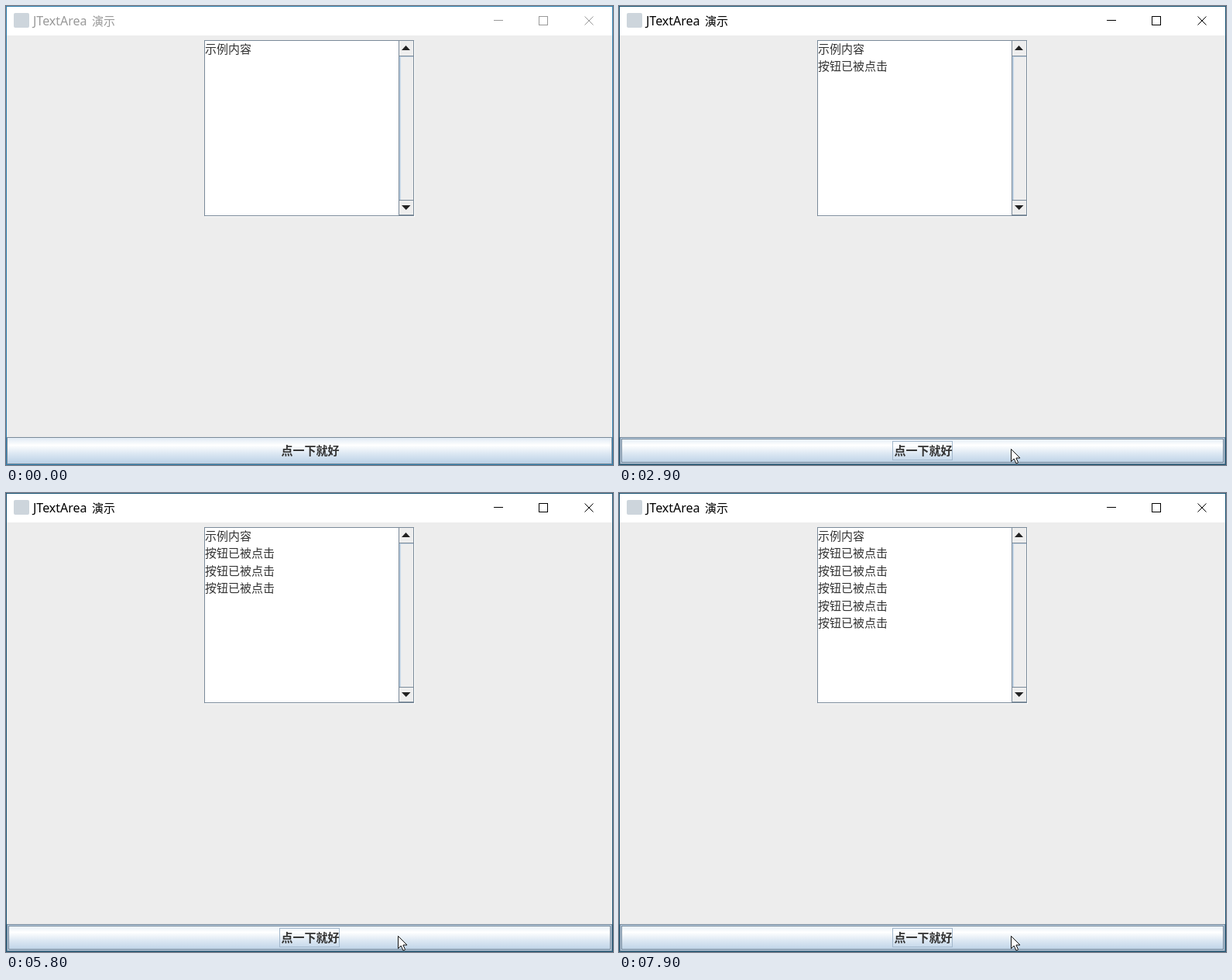
An HTML page that plays this animation: 784 px wide and 592 px high, repeating every 8000 ms.

```html
<!DOCTYPE html>
<html lang="zh">
<head>
<meta charset="utf-8">
<title>JTextArea 演示</title>
<style>
html, body { margin: 0; width: 100%; height: 100%; overflow: hidden; background: #ededed; }
svg { display: block; }
text { font-family: "Noto Sans CJK SC", "Noto Sans CJK", sans-serif; font-size: 15px; white-space: pre; }
.latin { font-family: "Noto Sans", sans-serif; font-size: 16px; }
.line { fill: none; stroke: #7a8a99; }
</style>
</head>
<body>
<svg width="784" height="592" viewBox="0 0 784 592">
  <defs>
    <linearGradient id="ocean" x2="0" y2="1">
      <stop offset="0" stop-color="#dde8f3"/>
      <stop offset=".3" stop-color="#fff"/>
      <stop offset=".6" stop-color="#dde8f3"/>
      <stop offset="1" stop-color="#b8cfe5"/>
    </linearGradient>
  </defs>
  <rect width="784" height="592" fill="#ededed"/>
  <rect width="784" height="38" fill="#fff"/>

  <rect x="10" y="9" width="20" height="19" rx="2" fill="#cdd5dc"/>
  <g id="caption">
    <text class="latin" x="35" y="25">JTextArea</text>
    <text x="111" y="25">演示</text>
  </g>
  <g id="controls" fill="none">
    <path d="M630 18.5h12M688.5 13.5h11v11h-11z" shape-rendering="crispEdges"/>
    <path d="M747.5 13.5l11 11M758.5 13.5l-11 11"/>
  </g>

  <g shape-rendering="crispEdges">
    <rect x="257" y="45" width="271" height="227" fill="#fff"/>
    <rect x="508" y="45" width="18" height="225" fill="#eee"/>
    <rect class="line" x="256.5" y="44.5" width="270" height="226"/>
    <path class="line" d="M507.5 45v225M508 64.5h18M508 250.5h18M508 269.5h18"/>
    <path d="M509.5 250V65.5H526" fill="none" stroke="#c4d3e2"/>
    <path d="M508.5 65v185" stroke="#b8cfe5"/>
  </g>
  <path d="M511 57l5.5-6 5.5 6zM511 257h11.5l-5.75 6z" fill="#222"/>
  <g id="rows" fill="#333"></g>

  <g shape-rendering="crispEdges">
    <rect id="face" x="1" y="556" width="782" height="35"/>
    <rect class="line" x="1.5" y="556.5" width="781" height="34"/>
    <g id="hover" fill="none">
      <rect x="2.5" y="557.5" width="779" height="32" stroke="#b8cfe5"/>
      <rect class="line" x="3.5" y="558.5" width="777" height="30"/>
    </g>
    <rect id="focus" x="353.5" y="561.5" width="77" height="24" fill="none" stroke="#a3b8cc"/>
  </g>
  <text x="355.5" y="579" font-weight="700" fill="#333">点一下就好</text>
  <rect id="frame" x=".5" y=".5" width="783" height="591" fill="none" shape-rendering="crispEdges"/>
  <path id="pointer" d="M.5.5V16.5L4.2 13 7 19 9.6 17.9 6.9 12H12z" fill="#fff" stroke="#111"/>
</svg>
<script>
const $ = id => document.getElementById(id);
const LOOP = 8000, ACTIVATE = 2700;
const clicks = [[2700, 2900], [4500, 4600], [5200, 5400], [6300, 6400], [7300, 7400]];
const labels = ["示例内容", ...clicks.map(() => "按钮已被点击")];

const rows = labels.map((label, i) => {
  const row = document.createElementNS("http://www.w3.org/2000/svg", "text");
  row.textContent = label;
  row.setAttribute("x", 257);
  row.setAttribute("y", Math.round(60.5 + 22.5 * i));
  $("rows").append(row);
  return row;
});

const show = (el, on) => el.setAttribute("visibility", on ? "visible" : "hidden");

function draw(ms) {
  const t = Math.floor(ms / 100) * 100;
  const active = t >= ACTIVATE;
  const pressed = clicks.some(([down, up]) => t >= down && t < up);

  $("caption").setAttribute("fill", active ? "#000" : "#999");
  $("controls").setAttribute("stroke", active ? "#000" : "#999");
  $("frame").setAttribute("stroke", active ? "#1b5575" : "#2f7fae");
  $("face").setAttribute("fill", pressed ? "#b8cfe5" : "url(#ocean)");
  show($("hover"), t >= 1900 && !pressed);
  show($("focus"), active);
  rows.forEach((row, i) => show(row, i === 0 || t >= clicks[i - 1][1]));

  // The pointer enters from below and settles on the button.
  const k = Math.min(1, Math.max(0, (t - 1700) / 600));
  const left = (1 - k) ** 2;
  show($("pointer"), t >= 1800);
  $("pointer").setAttribute("transform",
    `translate(${Math.round(506 + 110 * left)} ${Math.round(571 + 26 * left)})`);
}

const start = performance.now();
function tick() {
  draw((performance.now() - start) % LOOP);
  requestAnimationFrame(tick);
}
tick();
</script>
</body>
</html>
```
